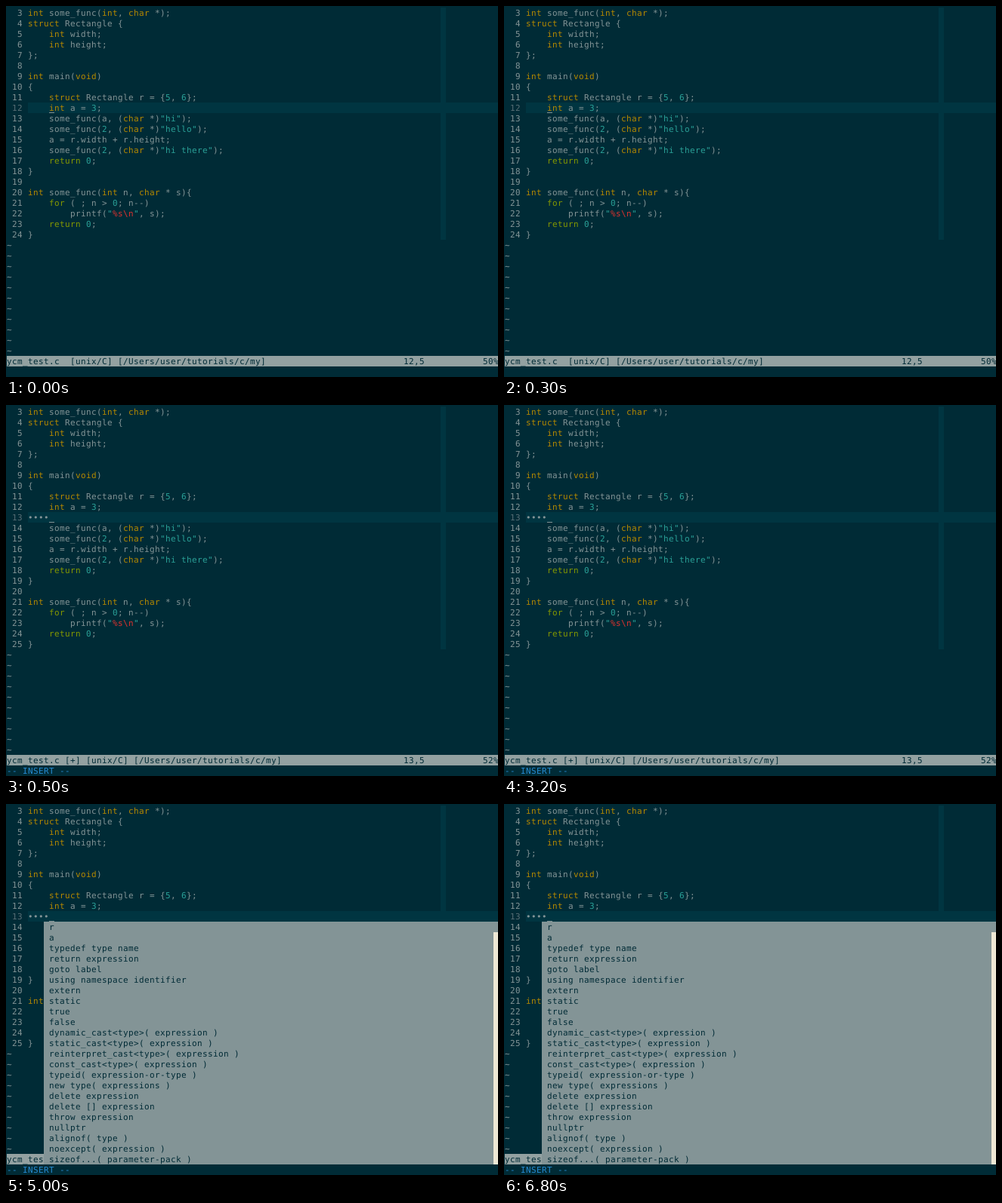
These frames come from a looping animation (651x492 px, 8 s). An HTML page with a canvas:

```html
<!DOCTYPE html>
<html lang="en">
<head>
<meta charset="utf-8">
<title>Editor completion</title>
<style>
html, body { margin: 0; width: 100%; height: 100%; overflow: hidden; background: #002b36; }
canvas { display: block; }
</style>
</head>
<body>
<canvas id="screen" width="651" height="492"></canvas>
<script>
const WIDTH = 651, CELL = 7, ROW = 14, LEFT = 1, TOP = 2, ASCENT = 11;
const LOOP = 8000, INSERT_AT = 500, MENU_AT = 5000;
const C = {
  bg: '#002b36', line: '#003541', dim: '#586e75', text: '#839496', bar: '#93a1a1',
  type: '#b58900', keyword: '#859900', value: '#2aa198', special: '#dc322f',
  mode: '#268bd2', track: '#eee8d5'
};

const code = String.raw`int some_func(int, char *);
struct Rectangle {
    int width;
    int height;
};

int main(void)
{
    struct Rectangle r = {5, 6};
    int a = 3;
    some_func(a, (char *)"hi");
    some_func(2, (char *)"hello");
    a = r.width + r.height;
    some_func(2, (char *)"hi there");
    return 0;
}

int some_func(int n, char * s){
    for ( ; n > 0; n--)
        printf("%s\n", s);
    return 0;
}`.split('\n');

const menu = `r
a
typedef type name
return expression
goto label
using namespace identifier
extern
static
true
false
dynamic_cast<type>( expression )
static_cast<type>( expression )
reinterpret_cast<type>( expression )
const_cast<type>( expression )
typeid( expression-or-type )
new type( expressions )
delete expression
delete [] expression
throw expression
nullptr
alignof( type )
noexcept( expression )
sizeof...( parameter-pack )`.split('\n');

const syntax = /(%s|\\n)|("[^"%\\]*"|"|\b\d+\b)|\b(int|char|void|struct)\b|\b(for|return)\b/g;
const ctx = document.getElementById('screen').getContext('2d');
const x = col => LEFT + col * CELL;
const y = row => TOP + row * ROW;

function fill(color, left, top, right, bottom) {
  ctx.fillStyle = color;
  ctx.fillRect(left, top, right - left, bottom - top);
}

// Every glyph sits on the terminal's cell grid.
function write(text, col, row, color) {
  ctx.fillStyle = color;
  [...text].forEach((ch, i) => {
    if (ch !== ' ') ctx.fillText(ch, x(col + i), y(row) + ASCENT);
  });
}

function writeCode(text, row) {
  let end = 0;
  for (const m of text.matchAll(syntax)) {
    write(text.slice(end, m.index), 4 + end, row, C.text);
    const color = m[1] ? C.special : m[2] ? C.value : m[3] ? C.type : C.keyword;
    write(m[0], 4 + m.index, row, color);
    end = m.index + m[0].length;
  }
  write(text.slice(end), 4 + end, row, C.text);
}

function drawMenu() {
  fill(C.text, x(7), y(11), WIDTH, y(34));
  fill(C.track, x(92), y(12), WIDTH, y(34));
  menu.forEach((item, i) => write(item, 8, 11 + i, C.bg));
}

function draw(inserting, menuOpen) {
  const lines = inserting ? [...code.slice(0, 10), '••••', ...code.slice(10)] : code;
  const current = inserting ? 10 : 9;
  ctx.font = '11px "DejaVu Sans Mono", monospace';
  ctx.textRendering = 'geometricPrecision';

  fill(C.bg, 0, 0, WIDTH, 492);
  fill(C.line, x(82), y(0), x(83), y(lines.length));
  fill(C.line, x(4), y(current), WIDTH, y(current + 1));
  lines.forEach((text, row) => {
    write(String(row + 3).padStart(3), 0, row, row === current ? C.dim : C.text);
    writeCode(text, row);
  });
  for (let row = lines.length; row < 33; row++) write('~', 0, row, C.text);
  fill(C.text, x(8), y(current + 1) - 1, x(9), y(current + 1));

  fill(C.bar, LEFT, y(33), WIDTH, y(34));
  write(`ycm_test.c ${inserting ? '[+]' : ''} [unix/C] [/Users/user/tutorials/c/my]`, 0, 33, C.bg);
  write(inserting ? '13,5' : '12,5', 75, 33, C.bg);
  write(inserting ? '52%' : '50%', 90, 33, C.bg);
  if (inserting) write('-- INSERT --', 0, 34, C.mode);
  if (menuOpen) drawMenu();
}

const start = performance.now();
function tick() {
  const time = (performance.now() - start) % LOOP;
  draw(time >= INSERT_AT, time >= MENU_AT);
  requestAnimationFrame(tick);
}
tick();
</script>
</body>
</html>
```
